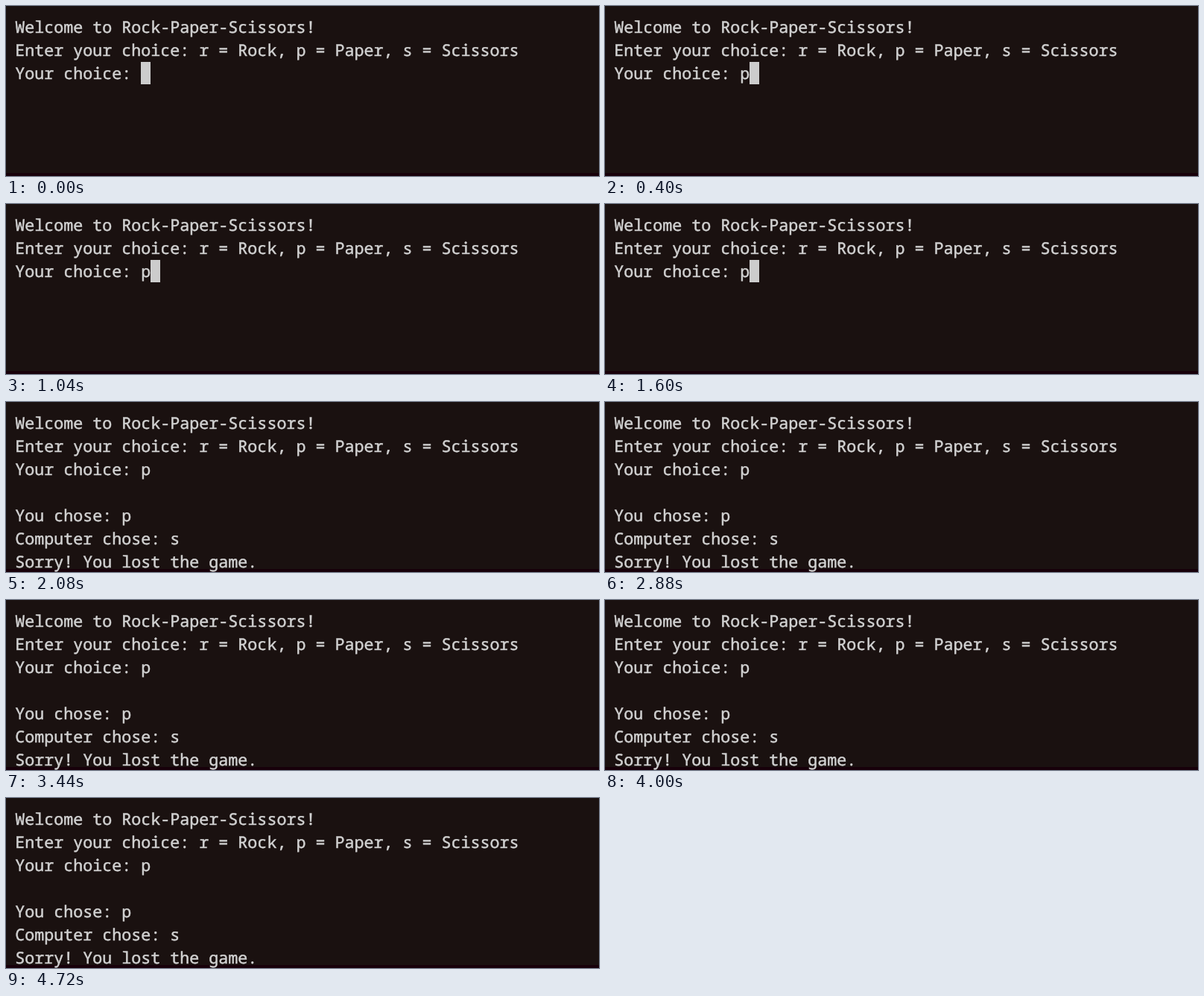
Write an HTML page that moves like this. It is 796x228 px and loops after 4800 ms.

```html
<!DOCTYPE html>
<html lang="en">
<head>
<meta charset="utf-8">
<title>Rock-Paper-Scissors</title>
<style>
  html, body { margin: 0; width: 100%; height: 100%; overflow: hidden; background: #1a1110; }
  svg { display: block; width: 796px; height: 228px; }
  text {
    font: 21.68px "Noto Sans Mono", "DejaVu Sans Mono", monospace;
    fill: #d2d2d2;
    stroke: #d2d2d2;
    stroke-width: 0.5px;
    white-space: pre;
    text-rendering: geometricPrecision;
  }
  .strip { fill: #17000a; }
  .cursor { fill: #cccccc; animation: cursor 4.8s step-end infinite; }
  .typed { animation: typed 4.8s step-end infinite; }
  .result { animation: result 4.8s step-end infinite; }

  @keyframes cursor {
    0% { transform: translate(181px, 75px); opacity: 1; }
    5% { transform: translate(194px, 75px); opacity: 1; }
    40% { transform: translate(12px, 106px); opacity: 1; }
    41.66%, 100% { transform: translate(12px, 106px); opacity: 0; }
  }
  @keyframes typed {
    0% { opacity: 0; }
    5%, 100% { opacity: 1; }
  }
  @keyframes result {
    0% { opacity: 0; }
    41.66%, 100% { opacity: 1; }
  }
</style>
</head>
<body>
<svg viewBox="0 0 796 228">
  <rect width="796" height="228" fill="#1a1110"/>
  <rect class="strip" y="224" width="796" height="4"/>
  <text x="12.3" y="36">Welcome to Rock-Paper-Scissors!</text>
  <text x="12.3" y="67">Enter your choice: r = Rock, p = Paper, s = Scissors</text>
  <text x="12.3" y="98">Your choice:</text>
  <text class="typed" x="181.3" y="98">p</text>
  <g class="result">
    <text x="12.3" y="160">You chose: p</text>
    <text x="12.3" y="191">Computer chose: s</text>
    <text x="12.3" y="222">Sorry! You lost the game.</text>
  </g>
  <rect class="cursor" width="13" height="30"/>
</svg>
</body>
</html>
```
